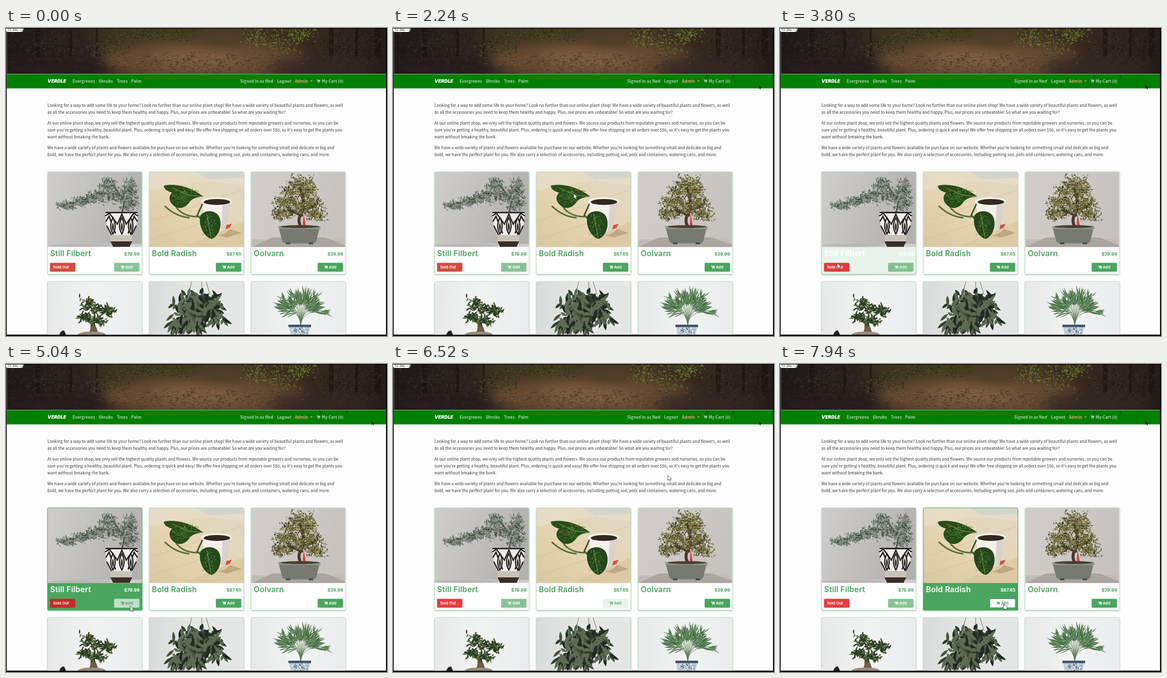
Recreate the animation shown at these times as an HTML page. Size 773 px wide and 625 px high, loop 8000 ms.

```html
<!DOCTYPE html>
<html lang="en">
<head>
<meta charset="utf-8">
<title>Plant shop</title>
<style>
html, body { margin: 0; width: 100%; height: 100%; overflow: hidden; background: #000; }
#stage { display: block; width: 100vw; height: 100vh; }
.body { font: 8.35px "Noto Sans CJK JP", "Noto Sans CJK SC", "Noto Sans CJK", "Open Sans", sans-serif; fill: #343a40; }
.nav { font: 700 8.3px "Noto Sans CJK JP", "Noto Sans CJK SC", "Noto Sans CJK", "Open Sans", sans-serif; fill: #a9d3a9; }
.brand { font: italic 900 9.6px Inter, sans-serif; fill: #fff; }
.title { font: 600 15.7px Inter, sans-serif; letter-spacing: .2px; }
.price { font: 700 9px Inter, sans-serif; text-anchor: end; }
.btn { font: 600 7.8px Inter, sans-serif; }
.tag { font: 6px "DejaVu Sans Mono", monospace; fill: #222; }
</style>
</head>
<body>
<svg id="stage" viewBox="0 0 773 625" preserveAspectRatio="none"></svg>
<script>
const stage = document.getElementById('stage');
const GREEN = [74, 165, 94], WHITE = [255, 255, 255], EDGE = [178, 219, 190];

let seed = 1;
const rnd = () => (seed = (seed * 16807) % 2147483647) / 2147483647;
const spread = r => (rnd() + rnd() - 1) * r;
const n1 = v => v.toFixed(1);

const rect = (x, y, w, h, fill, extra = '') =>
  `<rect x="${x}" y="${y}" width="${w}" height="${h}" fill="${fill}" ${extra}/>`;
const path = (d, fill, extra = '') => `<path d="${d}" fill="${fill}" ${extra}/>`;
const line = (d, color, width) =>
  `<path d="${d}" fill="none" stroke="${color}" stroke-width="${width}" stroke-linecap="round"/>`;
const oval = (x, y, rx, ry, fill, extra = '') =>
  `<ellipse cx="${x}" cy="${y}" rx="${rx}" ry="${ry}" fill="${fill}" ${extra}/>`;
const text = (x, y, cls, str, extra = '') => `<text x="${x}" y="${y}" class="${cls}" ${extra}>${str}</text>`;
const gradient = (id, dir, ...colors) => `<linearGradient id="${id}" ${dir}>` +
  colors.map((c, i) => `<stop offset="${i / (colors.length - 1)}" stop-color="${c}"/>`).join('') +
  '</linearGradient>';

function leaf(x, y, len, angle, width) {
  const dx = Math.cos(angle) * len, dy = Math.sin(angle) * len;
  const bx = -Math.sin(angle) * width, by = Math.cos(angle) * width;
  return `M${n1(x)} ${n1(y)}q${n1(dx / 2 + bx)} ${n1(dy / 2 + by)} ${n1(dx)} ${n1(dy)}` +
    `q${n1(-dx / 2 - bx)} ${n1(-dy / 2 - by)} ${n1(-dx)} ${n1(-dy)}z`;
}

// Scatters leaves over elliptical clumps, one layer per colour.
function foliage(clumps, count, len, width, colors, aim = 0, turn = Math.PI) {
  return colors.map(color => path(clumps.map(([x, y, rx, ry]) => {
    let d = '';
    for (let i = 0; i < count; i++) {
      d += leaf(x + spread(rx), y + spread(ry), len * (.6 + rnd() * .8), aim + (rnd() * 2 - 1) * turn, width);
    }
    return d;
  }).join(''), color)).join('');
}

const photo = (x, y, w, h, content) =>
  `<svg x="${x}" y="${y}" width="${w}" height="${h}" viewBox="${x} ${y} ${w} ${h}">${content}</svg>`;

function forest() {
  seed = 71;
  const glow = (x, y, rx, ry, c, o) => oval(x, y, rx, ry, c, `opacity="${o}" filter="url(#soft)"`);
  const trunks = [[60, 9], [128, 6], [182, 4], [655, 9], [708, 6], [748, 12]]
    .map(([x, w]) => rect(x, 0, w, 58, '#17120f', 'opacity=".6"')).join('');
  return photo(2, 1, 769, 92, rect(2, 1, 769, 92, 'url(#woods)') +
    glow(290, 12, 120, 22, '#3b3a1a', .8) + glow(400, 64, 210, 38, '#6a4f36', .9) +
    glow(390, 62, 90, 14, '#8d6d4c', .75) + glow(440, 20, 45, 20, '#4d3c25', .8) +
    glow(640, 80, 110, 26, '#302520', .8) + glow(90, 82, 120, 22, '#251c1a', .9) + trunks +
    foliage([[100, 40, 110, 45], [690, 40, 90, 48]], 130, 6, 1.4, ['#1b1715', '#352b26', '#3d322a']) +
    foliage([[300, 14, 110, 16], [210, 40, 50, 20]], 80, 5, 1.4, ['#26230f', '#494421', '#564a2a']) +
    foliage([[390, 70, 230, 24]], 170, 6, .9, ['#3f2e20', '#806145', '#55402c', '#2f241c'], 0, .4) +
    foliage([[510, 18, 38, 28], [560, 30, 40, 32], [600, 12, 35, 18]], 55, 5, 1.5, ['#2b3214', '#54642a', '#738232']));
}

function juniper() {
  seed = 12;
  let pattern = '';
  for (const x of [217, 235, 253]) {
    pattern += path(`M${x} 385q9 17 0 33q-9 -16 0 -33z`, '#f3f1ed', 'stroke="#1d1b1a" stroke-width="2.4"') +
      path(`M${x} 394q4 10 0 19q-4 -9 0 -19z`, '#2a2726');
  }
  return rect(85, 292, 191, 153, 'url(#wall1)') + rect(85, 438, 191, 7, '#d0cecb') +
    oval(150, 441, 66, 3, '#aaa7a4', 'opacity=".6"') +
    line('M235 374q9 -22 -2 -35q-35 -10 -70 8q-26 7 -52 15M232 340q-10 -18 -22 -26M240 350q15 -8 22 -18', '#564b43', 3) +
    foliage([[122, 361, 23, 7], [150, 352, 20, 10], [178, 345, 21, 14], [205, 336, 24, 22], [206, 318, 17, 13],
      [236, 343, 28, 18], [250, 325, 17, 20], [247, 358, 20, 15]], 40, 7, 1.6, ['#4e5b51', '#6c7a6c', '#3d4842', '#8a9689'], -.5, 1.5) +
    path('M202 373H267Q268 402 256 422L253 444H215L212 422Q201 400 202 373z', '#efede9') +
    path('M202 373h65v3h-65z', '#292625') +
    line('M202 381L210 376L226 398L235 378L244 398L259 376L267 381M203 392L209 382L222 416M266 392L260 382L248 416M205 402l9 18M264 402l-9 18', '#22201f', 2.6) +
    pattern + path('M211 420h46l-2 13h-41z', '#c9c2b7') + path('M212 433h44l-5 11h-34z', '#3b2d28');
}

function cutting() {
  seed = 33;
  const upper = 'M320 320C345 314 378 324 400 342C386 343 377 346 371 355C364 364 354 368 344 363C331 355 328 343 337 334C326 331 321 327 320 320z';
  const lower = 'M395 380C404 368 426 369 433 384C440 402 431 423 417 428C401 424 389 399 395 380z';
  return rect(291, 292, 191, 153, 'url(#wood)') +
    path('M291 292H482V318L400 310L291 330z', '#e8dfcb', 'opacity=".7"') +
    path('M385 292H482V304L410 307z', '#d4d4cd') + path('M360 445L482 392V445z', '#dac59e', 'opacity=".7"') +
    line('M291 393L480 329M291 430L394 397', '#cfb98f', .7) +
    path('M398 414q35 17 57 -6l23 8l-30 9z', '#bca983') +
    path('M398 352L457 352L448 405Q425 421 403 406z', '#f3f0eb') + path('M440 356L457 352L448 405L436 411z', '#d8d2c9') +
    oval(427, 352, 31, 8.5, '#f7f5f1') + oval(428, 353, 27, 6, '#322820') +
    line('M345 363Q359 384 394 383M323 362Q344 382 371 385M398 358L388 380L396 388', '#38552a', 3) +
    line('M345 363Q359 384 394 383M323 362Q344 382 371 385', '#719242', 1) +
    path(upper, '#294d1b') + path(lower, '#24481a') +
    foliage([[354, 344, 18, 15], [367, 333, 21, 6], [414, 399, 15, 23]], 36, 5, 1.2, ['#739344', '#48732d', '#173817']) +
    line('M338 325L371 339L397 342M407 377L416 426', '#8ca653', 1) +
    path('M447 400l11 -3l-4 8l-9 4z', '#d84f45');
}

function bonsai() {
  seed = 54;
  return rect(497, 292, 191, 153, 'url(#wall3)') + rect(497, 429, 191, 16, '#c0bbb4') +
    path('M497 445L540 425H648L688 441V445z', '#aaa59f') +
    line('M598 403q-8 -14 2 -28q7 -22 -3 -50M600 380l-25 -10M602 370l25 -9', '#4b372b', 6) +
    foliage([[598, 314, 31, 16], [584, 333, 31, 17], [615, 330, 18, 18], [567, 353, 26, 12], [621, 354, 26, 13],
      [561, 377, 25, 15], [595, 365, 30, 18], [628, 378, 23, 13]], 48, 5, 1.8, ['#4a4a26', '#6e6a36', '#343a20', '#8b8048']) +
    path('M604 377l4 24h-6z', '#d83f37') +
    path('M553 404L637 402L630 431Q628 437 621 437H570Q562 437 560 431z', '#777a70') +
    path('M552 402H638V408H554z', '#92938a') + oval(596, 403, 39, 3, '#4a4031') +
    path('M568 435h9v4h-9zM614 435h9v4h-9z', '#4e504a');
}

function ficus() {
  seed = 24;
  return rect(85, 515, 191, 108, 'url(#pale)') +
    line('M176 622Q169 602 178 593Q185 577 167 562M178 594L202 576M174 601L160 588', '#63503e', 3.2) +
    path('M168 623q4 -20 10 -24q8 10 9 24z', '#715c45') +
    foliage([[166, 560, 20, 14], [207, 574, 18, 12], [162, 588, 17, 8], [185, 569, 22, 11], [188, 594, 14, 7]], 20, 8, 2.8,
      ['#394b2b', '#546a3c', '#26371f']) +
    path('M145 623q3 -7 30 -7q25 0 28 7z', '#9b8c78') + path('M108 623q3 -10 10 -9l4 9z', '#24221f');
}

function hanging() {
  seed = 87;
  return rect(291, 515, 191, 108, 'url(#mist)') +
    line('M377 515l-7 25M397 515v20M406 515l8 26', '#444842', .8) + oval(395, 570, 22, 28, '#303b2e') +
    foliage([[384, 541, 34, 17], [362, 560, 28, 24], [415, 555, 28, 26], [391, 570, 31, 25], [367, 587, 15, 28],
      [427, 575, 14, 22], [389, 597, 15, 15], [344, 597, 11, 12]], 10, 18, 6, ['#303e2d', '#46543f', '#1f2b21', '#5d6b52'], 1.57, 1.1);
}

function palm() {
  seed = 65;
  let fronds = '';
  for (let i = 0; i < 15; i++) {
    const a = -2.95 + i * .2, len = 29 + rnd() * 15, x = 599 + Math.cos(a) * len, y = 579 + Math.sin(a) * len * .9;
    fronds += line(`M598 606Q598 575 ${n1(x)} ${n1(y)}`, '#5a7a4e', .9) +
      foliage([[(x + 599) / 2, (y + 576) / 2, 12, 6], [x, y + 3, 5, 4]], 5, 17, 2, ['#3f6841', '#668a5e'], a, .65);
  }
  return rect(497, 515, 191, 108, 'url(#pale)') + fronds +
    path('M574 604H618L613 623H578z', '#bac8d2') + path('M573 602h46v5h-46z', '#41566d') +
    foliage([[596, 615, 18, 7]], 32, 5, 1.6, ['#41607d', '#e5ebed']);
}

const cartIcon = (x, y) => `<g transform="translate(${x} ${y})"><path d="M0 .3H1.5L2.6 4.7H6.8M1.8 1.2H7.3L6.6 3.6L2.4 4z" ` +
  'fill="currentColor" stroke="currentColor" stroke-width=".8"/><circle cx="3" cy="6.2" r=".8" fill="currentColor"/>' +
  '<circle cx="6.2" cy="6.2" r=".8" fill="currentColor"/></g>';

const cards = [
  { x: 84, name: 'Still Filbert', price: '$79.99', art: juniper, soldOut: true },
  { x: 290.5, name: 'Bold Radish', price: '$87.65', art: cutting },
  { x: 497, name: 'Oolvarn', price: '$39.99', art: bonsai }
];
const frame = (x, y, h, extra = '') => rect(x + .3, y, 191.7, h, 'none', `rx="2.5" stroke="#b2dbbe" ${extra}`);

function cardMarkup({ x, name, price, art, soldOut }, i) {
  return rect(x, 292, 192.5, 208, '#fff', 'rx="3" filter="url(#shadow)"') +
    photo(Math.round(x + .6), 292, 191, 153, art()) +
    rect(x, 444.5, 192.3, 55, '#fff', `id="foot${i}"`) +
    `<g id="label${i}">${text(x + 5.5, 463, 'title', name)}${text(x + 187, 461.5, 'price', price)}</g>` +
    (soldOut ? rect(x + 5.3, 476.5, 51.5, 18, '#d24a43', 'id="sold" rx="2"') + text(x + 11.5, 488.2, 'btn', 'Sold Out', 'fill="#fff"') : '') +
    `<g id="button${i}" opacity="${soldOut ? .65 : 1}">${rect(x + 135.3, 476.5, 51.5, 18, '#4aa55e', `id="face${i}" rx="2"`)}` +
    `<g id="add${i}">${cartIcon(x + 148.5, 482)}${text(x + 158, 488.2, 'btn', 'Add', 'fill="currentColor"')}</g></g>` +
    frame(x, 291.8, 207.6, `id="edge${i}"`);
}

const lowerCard = (x, art) => rect(x, 514, 192.5, 120, '#fff', 'rx="3" filter="url(#shadow)"') +
  photo(Math.round(x + .6), 515, 191, 108, art()) + frame(x, 514.3, 120);

const paragraphs = [
  [160, 'Looking for a way to add some life to your home? Look no further than our online plant shop! We have a wide variety of beautiful plants and flowers, as well'],
  [174, 'as all the accessories you need to keep them healthy and happy. Plus, our prices are unbeatable! So what are you waiting for?'],
  [196, 'At our online plant shop, we only sell the highest quality plants and flowers. We source our products from reputable growers and nurseries, so you can be'],
  [210, "sure you're getting a healthy, beautiful plant. Plus, ordering is quick and easy! We offer free shipping on all orders over $50, so it's easy to get the plants you"],
  [224, 'want without breaking the bank.'],
  [245.5, "We have a wide variety of plants and flowers available for purchase on our website. Whether you're looking for something small and delicate or big and"],
  [259.5, 'bold, we have the perfect plant for you. We also carry a selection of accessories, including potting soil, pots and containers, watering cans, and more.']
];
const links = [[135, 'Evergreens'], [188, 'Shrubs'], [225, 'Trees'], [254, 'Palm'], [475, 'Signed in as Ned'], [550, 'Logout'], [640.5, 'My Cart (0)']];
const arrow = 'M0 0V10.5L2.5 8.2L4.2 12L6 11.2L4.4 7.6H7.6z';
const hand = 'M2 1Q3.2 0 4 1.2V5Q5.2 4.2 6 5.2Q7.2 4.7 7.8 5.8Q9.3 5.6 9.4 7V9.5Q9 11 8.2 12.8H3.8Q2.2 10.5 .4 8.4Q.2 7 2 7.8z';
const ghost = (id, x, y, color) => path(arrow, color, `id="${id}" transform="translate(${x} ${y}) scale(.8)"`);

stage.innerHTML = '<defs>' +
  gradient('woods', 'x1="0" x2="1"', '#1d191a', '#2b2320', '#453326', '#4a3729', '#37291f', '#241c1a') +
  gradient('wall1', 'x1="0" x2="1" y2=".3"', '#d0cecc', '#c3c1bf', '#b3b1af') +
  gradient('wood', 'x1="0" y1="1" x2="1" y2="0"', '#dac7a0', '#e6d6b4', '#dfd8c6') +
  gradient('wall3', 'x1="0" x2="1" y2=".4"', '#d2cdca', '#cdc9c6', '#c5c2c0') +
  gradient('pale', 'x1="0" x2="1"', '#e8e9e9', '#f1f2f2', '#ebecee') +
  gradient('mist', 'x1="0" x2="1"', '#d8dcda', '#e5e7e5', '#e5e7e6') +
  '<filter id="soft" x="-50%" y="-50%" width="200%" height="200%"><feGaussianBlur stdDeviation="12"/></filter>' +
  '<filter id="shadow"><feDropShadow dx="0" dy="1.2" stdDeviation="1.2" flood-color="#5d9b70" flood-opacity=".6"/></filter></defs>' +
  rect(0, 0, 773, 625, '#000') + rect(1.5, 1, 769.5, 621.5, '#fdfdfd') + forest() +
  path('M0 1H36Q35 8 31 8H4Q1 8 0 5z', '#fff') + text(3, 6, 'tag', '72.9Hz →3') +
  rect(1.5, 93.5, 769.5, 29, '#008000') + text(84, 111.3, 'brand', 'VERDLE') +
  links.map(([x, str]) => text(x, 111, 'nav', str)).join('') +
  text(586, 111, 'nav', 'Admin', 'style="fill:#efa276"') + path('M617 106.5h5l-2.5 2.8z', '#efa276') +
  `<g color="#a9d3a9">${cartIcon(630, 104.3)}</g>` +
  paragraphs.map(([y, str]) => text(84, y, 'body', str)).join('') +
  cards.map(cardMarkup).join('') + lowerCard(84, ficus) + lowerCard(290.5, hanging) + lowerCard(497, palm) +
  rect(0, 622.5, 773, 2.5, '#000') +
  ghost('trailA', 741.5, 115, '#08210c') + ghost('trailB', 689, 93.5, '#04600a') +
  ghost('trailC', 635.5, 93.5, '#04600a') +
  path(arrow, '#fff', 'id="arrow" stroke="#222" stroke-width=".7"') +
  path(hand, '#fff', 'id="hand" stroke="#222" stroke-width=".8"');

const el = id => document.getElementById(id);
const set = (id, name, value) => el(id).setAttribute(name, value);
const show = (id, on) => set(id, 'visibility', on ? 'visible' : 'hidden');
const mix = (a, b, k) => `rgb(${a.map((v, i) => Math.round(v + (b[i] - v) * k))})`;

// Linear interpolation over [time, ...values] keys.
function track(keys, t) {
  if (t <= keys[0][0]) return keys[0].slice(1);
  for (let i = 1; i < keys.length; i++) {
    const a = keys[i - 1], b = keys[i];
    if (t <= b[0]) return a.slice(1).map((v, j) => v + (b[j + 1] - v) * (t - a[0]) / (b[0] - a[0]));
  }
  return keys[keys.length - 1].slice(1);
}

const pointer = [[250, 757, 300], [600, 742, 116], [1000, 689, 94], [1180, 611, 88], [1280, 611, 88], [1450, 650, 86],
  [1650, 648, 142], [1830, 637, 131], [1900, 620, 140], [2530, 152, 502], [2660, 132, 486], [3050, 132, 486],
  [3250, 58, 484], [3500, 62, 474], [3800, 116, 477], [4100, 140, 484], [4630, 250, 489], [5040, 252, 491],
  [5370, 238, 479], [5480, 238, 479], [5520, 240, 480], [6250, 240, 480], [6520, 557, 226], [6580, 590, 201],
  [6700, 668, 470], [6860, 560, 470], [7000, 450, 451], [7070, 450, 455], [7270, 450, 483]];
const footFade = [
  [[2600, 0], [2660, .22], [2850, 1], [3150, 1], [3270, 0], [3740, 0], [3800, .12], [4000, 1], [6290, 1], [6450, 0]],
  [[6320, 0], [6400, .3], [6470, 0], [6840, 0], [7000, 1]],
  [[0, 0]]
];
const buttonFade = [
  [[2600, 0], [2660, .5], [2850, 1], [3150, 1], [3300, 0], [3800, 0], [4000, 1], [6290, 1], [6500, 0]],
  [[6320, 0], [6420, 1], [6520, .88], [6650, 0], [6840, 0], [7000, 1]],
  [[6620, 0], [6690, .6], [6800, 0]]
];

function draw(t) {
  cards.forEach((card, i) => {
    const [foot] = track(footFade[i], t), [button] = track(buttonFade[i], t);
    set('foot' + i, 'fill', mix(WHITE, GREEN, foot));
    set('label' + i, 'fill', foot > .02 ? '#fff' : mix(GREEN, GREEN, 0));
    set('edge' + i, 'stroke', mix(EDGE, GREEN, foot));
    set('face' + i, 'fill', mix(GREEN, WHITE, button));
    set('add' + i, 'color', mix(WHITE, GREEN, button));
    if (card.soldOut) set('sold', 'fill', t < 2600 ? '#d24a43' : mix([230, 59, 62], [196, 42, 38], foot));
  });
  const focused = t >= 7890;
  set('face1', 'stroke', focused ? '#4f8596' : 'none');
  show('trailA', t > 640);
  show('trailB', t > 1040);
  show('trailC', t > 1860);

  const [x, y] = track(pointer, t), overLink = t >= 7470;
  show('arrow', t >= 250 && !overLink);
  show('hand', overLink);
  set('arrow', 'transform', `translate(${n1(x)} ${n1(y)})`);
  set('hand', 'transform', 'translate(451.5 485)');
}

const start = performance.now();
function tick() {
  draw((performance.now() - start) % 8000);
  requestAnimationFrame(tick);
}
draw(0);
requestAnimationFrame(tick);
</script>
</body>
</html>
```
